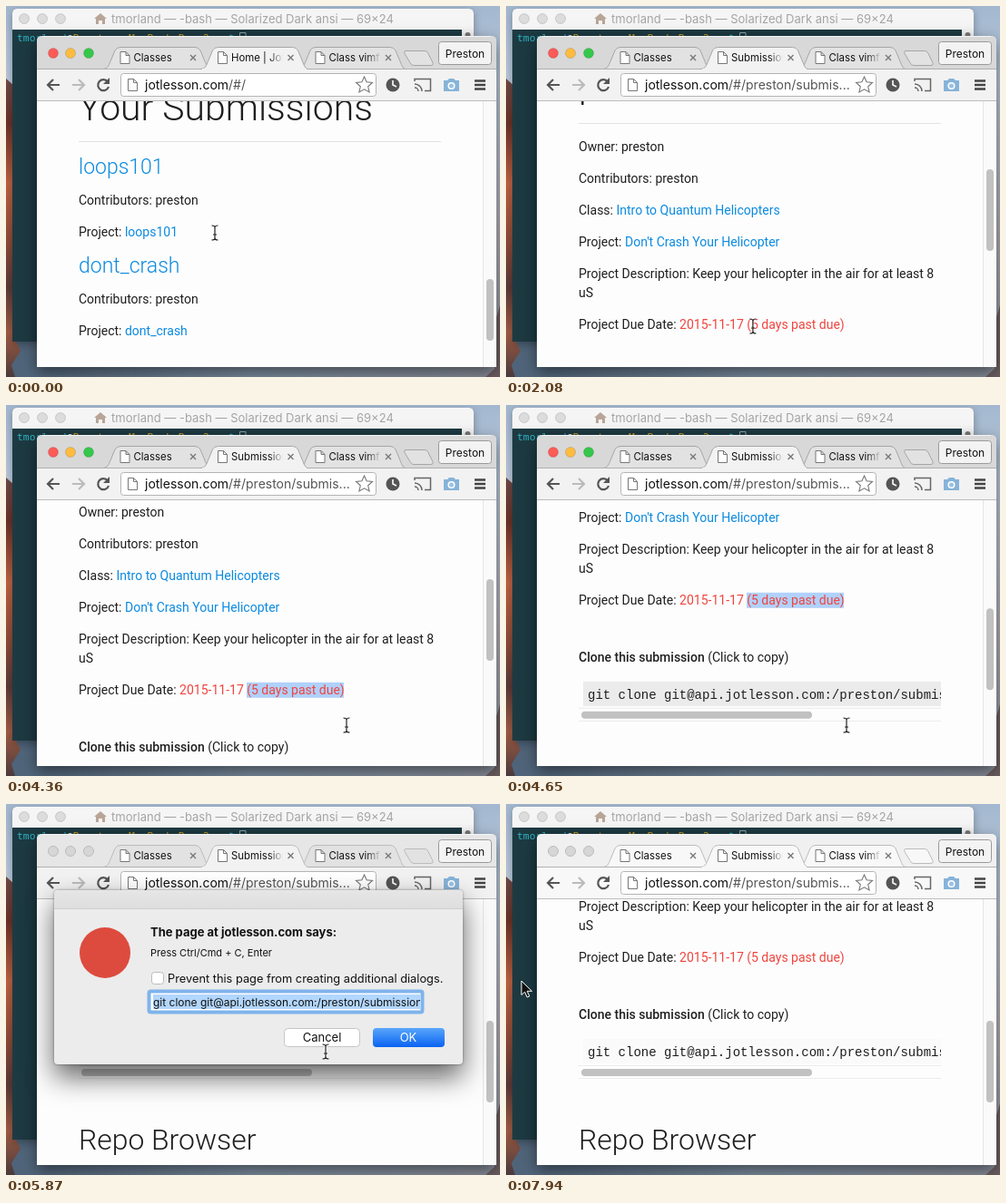
Animation of 544 by 409 pixels, one loop 7990 ms. Source, as an HTML page:

```html
<!DOCTYPE html>
<html lang="en">
<head>
<meta charset="utf-8">
<title>Submission walkthrough</title>
<style>
html, body { margin: 0; width: 100%; height: 100%; overflow: hidden; }
svg { display: block; }
text { font: 14px Roboto, sans-serif; fill: #1e1e1e; white-space: pre; }
.ui { font-family: Inter, sans-serif; fill: #111; }
.h3 { font-size: 40.9px; font-weight: 300; }
.h4 { font-size: 31.9px; font-weight: 300; }
.h5 { font-size: 23px; font-weight: 300; }
.mono { font-family: "Liberation Mono", monospace; }
.prompt { font: 11.35px "DejaVu Sans Mono", monospace; fill: #2fb4c4; }
.host { fill: #c9a227; }
.link { fill: #0b8ae0; }
.late { fill: #f0443e; }
.medium { font-weight: 500; }
.bold { font-weight: 700; }
.white { fill: #fff; }
.faint { fill: #a4a4a4; }
.path { fill: #555; }
.fade { fill: url(#fade); }
.rule { stroke: #e2e2e2; }
.thumb { fill: #c1c1c1; }
.strip { fill: #d8d8d8; }
.bar, .tab.on { fill: #f2f2f2; }
.tab { fill: #e2e2e2; stroke: #a6a6a6; }
.code { fill: #ebebeb; }
.idle .strip { fill: #e6e6e6; }
.idle .tab { stroke: #bcbcbc; }
.idle .light { fill: #d6d6d6; stroke: #bcbcbc; }
.away .strip { fill: #f0f0f0; }
.away .tab, .away .bar { fill: #f8f8f8; }
.away .code { fill: #fafafa; }
.back { filter: drop-shadow(0 3px 5px rgba(0,0,0,.3)); }
.front { filter: drop-shadow(0 6px 9px rgba(0,0,0,.5)); }
#dialog { transform-origin: 278px 191px; }
.sheet { filter: drop-shadow(0 0 1.5px rgba(0,0,0,.4)) drop-shadow(0 14px 15px rgba(0,0,0,.6)); }
</style>
</head>
<body>
<svg id="stage" width="544" height="409" viewBox="0 0 544 409"></svg>
<script>
const LOOP = 7990;
const site = "jotlesson.com", user = "preston";
const repo = `git clone git@api.${site}:/${user}/submissions/dont_crash.git`;

const text = (x, y, s, cls = "", extra = "") => `<text x="${x}" y="${y}" class="${cls}" ${extra}>${s}</text>`;
const ui = (x, y, s, size, cls = "", extra = "") => text(x, y, s, "ui " + cls, `style="font-size:${size}px" ${extra}`);
const centered = 'text-anchor="middle"';
const span = (s, cls, extra = "") => `<tspan class="${cls}" ${extra}>${s}</tspan>`;
const box = (x, y, w, h, extra = "") => `<rect x="${x}" y="${y}" width="${w}" height="${h}" ${extra}/>`;
const line = (d, color, w = 1, extra = "") => `<path d="${d}" fill="none" stroke="${color}" stroke-width="${w}" ${extra}/>`;
const rule = y => `<path class="rule" d="M80 ${y}.5H479"/>`;
const gradient = (id, stops, extra = 'x2="0" y2="1"') => `<linearGradient id="${id}" ${extra}>` +
  stops.map(([at, c]) => `<stop offset="${at}" stop-color="${c}"/>`).join("") + "</linearGradient>";
const lights = (xs, y, colors) => xs.map((x, i) =>
  `<circle class="light" cx="${x}" cy="${y}" r="5.5" fill="${colors[i]}" stroke="#0002"/>`).join("");
const sheetIcon = (x, y) => `<path d="M${x - 4.5} ${y - 6.5}h6l4 4v9h-10zM${x + 1.5} ${y - 6.5}v4h4" fill="#fff" stroke="#777"/>`;

const tab = (x, title, on = "", id = "") => `<g transform="translate(${x})">
  <path class="tab ${on}" d="M0 69.5C5 69 6 66 8 61L13 49Q15 45.5 19 45.5H101Q105 45.5 107 49L112 61C114 66 115 69 118 69.5"/>
  ${sheetIcon(23.5, 57)}
  <svg x="33" y="45" width="57" height="24">${ui(.5, 16, title, 11.4, "fade", `id="${id}"`)}</svg>
  ${line("M96 54l6 6m0-6l-6 6", "#777", 1.4)}</g>`;

const desktop = `${box(0, 0, 544, 409, 'fill="url(#sky)"')}
  ${box(0, 370, 544, 39, 'fill="url(#water)"')}
  <path d="M0 80L9 88V366L16 380L6 396L10 409H0z" fill="url(#rock)"/>
  <path d="M544 330L538 350V400L528 409H544z" fill="#6d5f62"/>`;

const grays = ["#dcdcdc", "#dcdcdc", "#dcdcdc"];
const terminal = `<path class="back" d="M7 370V8q0-5 5-5H510q5 0 5 5V370z" fill="#1d3a42"/>
  <path d="M7 26V8q0-5 5-5H510q5 0 5 5V26z" fill="#f5f5f5"/>
  ${lights([20, 40, 60], 14, grays)}
  <path d="M97 14l7-6 7 6h-2v6h-3v-4h-4v4h-3v-6z" fill="#b9a597"/>
  ${ui(116, 19, "tmorland — -bash — Solarized Dark ansi — 69×24", 13, "faint")}
  ${text(12, 39, "tmorland" + span("@", "white") + span("Prestons-MacBook-Pro-2", "host") + ":~ $ ", "prompt")}
  ${line("M257.5 34V29.5H264V34", "#8fa3a5")}
  ${box(502, 26, 13, 8, 'fill="#f4f4f4"')}${box(505.5, 29, 6, 6, 'rx="3" fill="#777"')}`;

const toolbar = `
  <path class="strip" d="M34 70V39q0-6 6-6H534q6 0 6 6V70z"/>
  ${line("M40 33.5H534", "#f4f4f4")}
  ${lights([52, 71, 91], 52, ["#fc5b57", "#fdbc40", "#34c84a"])}
  ${tab(322, "Class vimftw")}${tab(107, "Classes")}
  <path class="tab" d="M440 49.5H461q3 0 4 3l5 10q1 3-2 3H449q-3 0-4-3l-6-10q-1-3 1-3z"/>
  ${line("M34 69.5H540", "#b0b0b0")}
  <path class="bar" d="M34 70H540V105H34z"/>
  ${tab(214.5, "", "on", "title")}
  <path class="bar" d="M216 69H331V72H216z"/>
  ${line("M34 104.5H540", "#bdbdbd")}
  ${box(476.5, 39.5, 58, 25, 'rx="3" fill="#f3f3f3" stroke="#9a9a9a"')}
  ${ui(505.5, 57, "Preston", 12, "", centered)}
  ${line("M59 87H46m6-6l-6 6 6 6", "#555", 2.2)}${line("M73 87H86m-6-6l6 6-6 6", "#bbb", 2.2)}
  ${line("M112 83.5A6 6 0 1 0 113 89", "#555", 2.2)}<path d="M114 79v7h-7z" fill="#555"/>
  ${box(126.5, 74.5, 281, 25, 'rx="3" fill="#fff" stroke="#b4b4b4"')}
  ${sheetIcon(139, 87)}${text(153, 92, site + span("", "path", 'id="path"'), "ui")}
  ${line("M394.5 78l2.6 5.8 6.4.7-4.8 4.3 1.4 6.2-5.6-3.2-5.6 3.2 1.4-6.2-4.8-4.3 6.4-.7z", "#777", 1.1)}
  <circle cx="426" cy="87" r="7.5" fill="#555"/>${line("M426 82v5l4 2", "#fff", 1.6)}
  ${line("M450 83V80.5H467.5V93.5H461M450 86a8 8 0 0 1 8 8M450 90a4 4 0 0 1 4 4", "#666", 1.5)}
  <path d="M482 82h4l2-2h5l2 2h4v12h-17z" fill="#86b3d9"/><circle cx="490.5" cy="88" r="3.3" fill="#9cc2e2" stroke="#fff" stroke-width="1.5"/>
  ${line("M516 82.5h12m-12 4.5h12m-12 4.5h12", "#444", 2.3)}`;

const listed = (name, y) => text(80, y, name, "h5 link") +
  text(80, y + 34, `Contributors: ${user}`) + text(80, y + 69, `Project: ${span(name, "link")}`);

const listPage = text(80, 126, "Your Submissions", "h3") + rule(149) + listed("loops101", 185) + listed("dont_crash", 294);

const loadingPage = text(80, 180, "Repo Browser", "h4") + rule(200) +
  text(80, 231, "instructions_for_not_crashing.md", "link") + rule(251) +
  box(80, 260, 235, 36, 'rx="2" fill="#ef554d" style="filter:drop-shadow(0 2px 3px #0006)"') +
  text(107, 283, "DELETE THIS SUBMISSION", "white medium", 'letter-spacing=".5"') +
  box(34, 316, 492, 90, 'fill="#ec6f72"') +
  text(80, 351, "© 2015 JotLesson Team", "white medium") + text(80, 372, "Last Updated: a day ago", "white medium");

const detailPage = text(80, 101, `${user}/dont_crash`, "h3") + rule(129) +
  text(80, 160, `Owner: ${user}`) + text(80, 195, `Contributors: ${user}`) +
  text(80, 230, "Class: " + span("Intro to Quantum Helicopters", "link")) +
  text(80, 265, "Project: " + span("Don't Crash Your Helicopter", "link")) +
  text(80, 300, "Project Description: Keep your helicopter in the air for at least 8") + text(80, 321, "uS") +
  '<rect id="selection" x="265" y="343" height="17" fill="#b0d1fb"/>' +
  text(80, 356, "Project Due Date: " + span("2015-11-17 (5 days past due)", "late")) +
  text(80, 419, span("Clone this submission", "medium") + " (Click to copy)") +
  box(85, 441, 394, 27, 'class="code"') +
  `<svg x="80" y="441" width="399" height="27">${text(10, 19, repo, "mono")}</svg>` +
  line("M80 470.5H479M80 484.5H479", "#ececec") + box(83, 474, 254, 8, 'rx="4" class="thumb"') +
  text(80, 563, "Repo Browser", "h4");

const browser = `<path class="front" d="M34 398V39q0-6 6-6H534q6 0 6 6V398z" fill="#fdfdfd"/>${toolbar}
  <svg x="34" y="105" width="506" height="293" viewBox="34 105 506 293">
    <g id="list">${listPage}</g><g id="loading">${loadingPage}</g><g id="detail">${detailPage}</g>
    ${box(526, 105, 14, 293, 'fill="#fafafa"')}${line("M525.5 105V398", "#e6e6e6")}
    <rect id="scroller" class="thumb" x="529" width="8" rx="4"/>
    <g id="status"><path d="M34 380.5H199q4 0 4 4V398H34z" fill="#e2e2e2" stroke="#b5b5b5"/>
    ${ui(38, 393, `${site}/#/${user}/su...`, 11.3)}</g>
  </svg>`;

const dialog = `${box(53, 95, 450, 192, 'rx="4" fill="#ececec" class="sheet"')}
  <path d="M53 115V99q0-4 4-4H499q4 0 4 4V115z" fill="url(#cap)"/>${line("M53 115.5H503", "#cfcfcf")}
  <circle cx="109" cy="164" r="28" fill="#dd4b3e"/>
  ${ui(159, 146, `The page at ${site} says:`, 13, "bold")}
  ${ui(159, 168, "Press Ctrl/Cmd + C, Enter", 11)}
  ${box(160.5, 185.5, 13, 13, 'rx="3" fill="#fff" stroke="#bbb"')}
  ${ui(178, 197, "Prevent this page from creating additional dialogs.", 12.8)}
  ${box(157.5, 206.5, 301, 23, 'rx="2" fill="#fff" stroke="#7fb3ec" stroke-width="4"')}
  ${box(162, 210, 294, 16, 'fill="#b2d6fd"')}
  <svg x="162" y="207" width="294" height="22">${ui(0, 15.5, repo, 12)}</svg>
  ${box(306.5, 247.5, 83, 20, 'rx="4" fill="#fff" stroke="#c6c6c6"')}${ui(348, 262, "Cancel", 13, "", centered)}
  ${box(404, 247, 79, 21, 'rx="4" fill="url(#blue)"')}${ui(443, 262, "OK", 13, "white", centered)}`;

const beam = "M-3.5-8Q0-8 0-6Q0-8 3.5-8M0-6V6M-3.5 8Q0 8 0 6Q0 8 3.5 8M-2 2H2";
const pointers = `<g id="beam">${line(beam, "#fff", 3, 'opacity=".7"')}${line(beam, "#222", 1.2)}</g>
  <path id="arrow" d="M0 0V15.5L3.7 12.2 6.2 18 8.8 17 6.3 11.3H11.5z" fill="#111" stroke="#fff"/>
  <path id="hand" d="M-1.5 1.5a1.5 1.5 0 0 1 3 0v5l6 1.5q2 .5 2 3l-1.5 6h-8l-5-7q0-2.5 3.5 0z" fill="#fff" stroke="#222"/>`;

document.getElementById("stage").innerHTML = `<defs>
  ${gradient("sky", [[0, "#a3b8d0"], [.2, "#b9c8da"], [.6, "#b0adb5"], [1, "#8a8f9b"]])}
  ${gradient("rock", [[0, "#6d4a48"], [.15, "#6a3229"], [.35, "#bd6242"], [.55, "#8c4a38"], [.7, "#5a3a38"], [.85, "#a05c44"], [1, "#4a3a3c"]])}
  ${gradient("water", [[0, "#4d6278"], [.5, "#7d8ea0"], [1, "#8a8f9b"]], "")}
  ${gradient("cap", [[0, "#e6e6e6"], [1, "#dedede"]])}
  ${gradient("blue", [[0, "#59a6fb"], [1, "#0a63f2"]])}
  ${gradient("fade", [[0, "#111"], [1, "#1110"]], 'gradientUnits="userSpaceOnUse" x1="42" x2="58"')}
  </defs>${desktop}${terminal}<g id="browser">${browser}</g><g id="dialog">${dialog}</g><g id="pointer">${pointers}</g>`;

const $ = id => document.getElementById(id);
const show = (id, on) => $(id).setAttribute("display", on ? "inline" : "none");
const within = (t, a, b) => t >= a && t < b;
const ease = (t, a, b) => { const p = Math.min(1, Math.max(0, (t - a) / (b - a))); return p * p * (3 - 2 * p); };

const route = [[0, 230, 250], [60, 230, 250], [800, 165, 282], [1180, 165, 282], [1960, 272, 353], [2060, 272, 353],
  [2370, 265, 352], [2750, 265, 352], [3530, 375, 353], [5010, 375, 353], [5480, 352, 273], [6550, 352, 273],
  [6920, 448, 255], [7130, 448, 255], [7880, 17, 195], [LOOP, 17, 195]];

function pointerAt(t) {
  const i = route.findIndex(k => k[0] > t), a = route[i - 1], b = route[i], p = ease(t, a[0], b[0]);
  return [a[1] + (b[1] - a[1]) * p, a[2] + (b[2] - a[2]) * p];
}

function draw(t) {
  const listing = t < 880, loading = within(t, 880, 990), prompting = within(t, 5640, 6990), away = t >= 7880;
  const scroll = 182 * ease(t, 4140, 4900), [x, y] = pointerAt(t);

  show("list", listing);
  show("loading", loading);
  show("detail", t >= 990);
  show("status", within(t, 620, 1300));
  $("title").textContent = listing ? "Home | JotLesson" : "Submission";
  $("path").textContent = listing ? "/#/" : `/#/${user}/submis...`;
  $("detail").setAttribute("transform", `translate(0 ${-scroll})`);
  const [top, height] = listing ? [301, 68] : loading ? [234, 162] : [180 + scroll * .324, 90];
  $("scroller").setAttribute("y", top);
  $("scroller").setAttribute("height", height);
  $("selection").setAttribute("width", within(t, 2750, 5500) ? Math.min(107, Math.max(0, x - 265)) : 0);
  $("browser").setAttribute("class", (prompting || away ? "idle " : "") + (away ? "away" : ""));

  show("dialog", prompting);
  const zoom = .75 + .29 * ease(t, 5620, 5750) - .04 * ease(t, 5750, 5860);
  $("dialog").style.transform = `scale(${zoom})`;
  $("dialog").style.opacity = .3 + .7 * ease(t, 5620, 5740);

  const hand = within(t, 620, 880), arrow = within(t, 880, 1200) || t >= 7100;
  show("hand", hand);
  show("arrow", arrow);
  show("beam", !hand && !arrow);
  $("pointer").setAttribute("transform", `translate(${x} ${y})`);
}

const start = performance.now();
(function tick() {
  draw((performance.now() - start) % LOOP);
  requestAnimationFrame(tick);
})();
</script>
</body>
</html>
```
